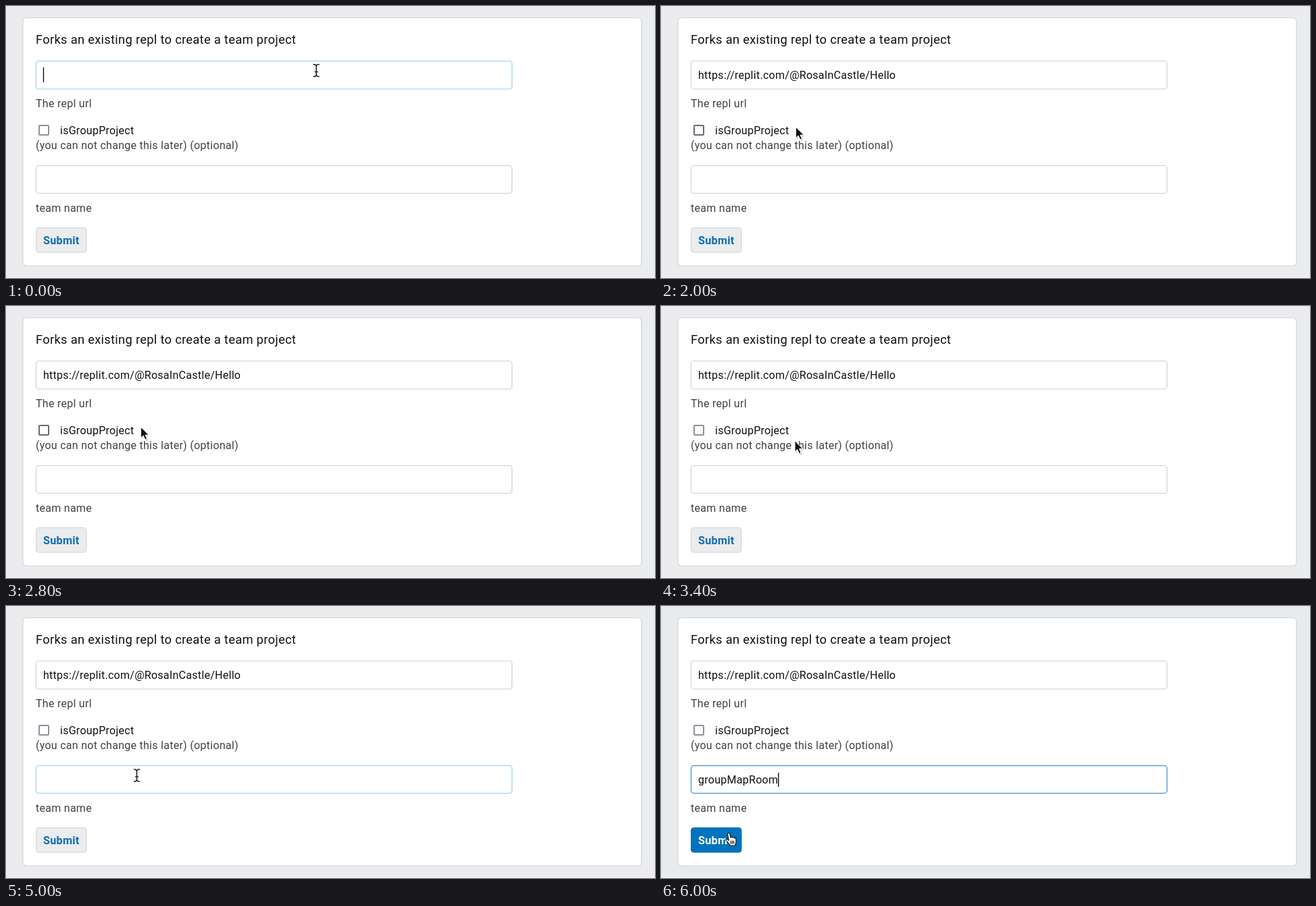
An HTML page that plays this animation: 960x403 px, repeating every 6.2 s.

```html
<!DOCTYPE html>
<html lang="en">
<head>
<meta charset="utf-8">
<title>Fork a team project</title>
<style>
  html, body { margin: 0; width: 100%; height: 100%; overflow: hidden; background: #ebecee; }
  svg { display: block; width: 960px; height: 403px; }
  text { font: 16px Roboto, "Open Sans", sans-serif; letter-spacing: .017em; fill: #111; }
  .title { font-size: 18.3px; }
  .label { fill: #404144; }
  .field { fill: #fff; stroke: #cfd0d2; stroke-width: 1.2; }
  .field.soft { stroke: #98d0ec; }
  .field.strong { stroke: #5b9fd0; stroke-width: 1.5; }
  .caret { stroke: #000; stroke-width: 1.3; }
  #box { fill: #fff; stroke: #918f9c; stroke-width: 2; }
  #box.hover { stroke: #6a6877; }
  #button rect { fill: #ebecee; stroke: #d1d2d5; }
  #button text { font-weight: 700; font-size: 16.2px; fill: #0f6cb3; }
  #button.hover rect { fill: #0073bd; stroke: #0073bd; }
  #button.hover text { fill: #fff; }
  .pointer { stroke-linejoin: round; stroke-linecap: round; }
</style>
</head>
<body>
<svg viewBox="0 0 960 403">
  <rect id="page" width="960" height="402" fill="#ebecee"/>
  <rect y="402" width="960" height="1" fill="#f8f8f9"/>
  <rect x="25" y="17.5" width="915" height="367.5" rx="5" fill="#fff" stroke="#d3d5d8" stroke-width="1.2"/>

  <text class="title" x="44" y="56">Forks an existing repl to create a team project</text>

  <rect id="urlField" x="44.5" y="81.5" width="704" height="41.5" rx="4"/>
  <text id="urlText" x="55" y="108"></text>
  <text class="label" x="44" y="150">The repl url</text>

  <rect id="box" x="49" y="177" width="14" height="14" rx="1"/>
  <text x="80" y="190">isGroupProject</text>
  <text class="label" x="44" y="212">(you can not change this later) (optional)</text>

  <rect id="teamField" x="44.5" y="236.5" width="704" height="41" rx="4"/>
  <text id="teamText" x="55" y="263"></text>
  <text class="label" x="44" y="305">team name</text>

  <g id="button">
    <rect x="44.5" y="328.5" width="74.5" height="36.5" rx="4"/>
    <text x="55" y="353">Submit</text>
  </g>

  <path id="urlCaret" class="caret" d="M0 91V113"/>
  <path id="teamCaret" class="caret" d="M0 247V268"/>

  <!-- pointers: beam is centred, arrow and hand hang from the tip -->
  <g id="beam" class="pointer" fill="none" stroke="#222" stroke-width="1.6">
    <path d="M-4 -9Q0 -9 0 -6Q0 -9 4 -9M0 -6V6M-4 9Q0 9 0 6Q0 9 4 9M-2 2H2"/>
  </g>
  <g id="arrow" class="pointer">
    <path d="M1 2V18L5 15L8 21L11 19.500L9 14H13Z" fill="#000" opacity=".15"/>
    <path d="M0 0V16L3.700 12.600L6.300 18.500L9 17.300L6.500 11.600H11.500Z" fill="#111" stroke="#fff"/>
  </g>
  <g id="hand" class="pointer" fill="#fff" stroke="#111" stroke-width="1.2">
    <path d="M0 1.500C0 -.8 3 -.8 3.300 1.300L4.500 6.500C5 5 7 5.200 7.300 6.800C8 5.600 9.800 6 10 7.500C11 6.800 12.500 7.500 12.500 9V13C12.500 15 11.500 16 11.200 18.500H3.500C3 16 0 14 -2.500 10.500C-3.500 9 -1.500 7.800 -.3 9.200L1.700 10.800Z"/>
    <path d="M4.800 11.500V15.500M7 11.500V15.500M9.200 11.500V15.500"/>
  </g>
</svg>

<script>
const LOOP = 6200, TICK = 200;
const URL_VALUE = "https://replit.com/@RosaInCastle/Hello";
const TEAM_VALUE = "groupMapRoom";

const START = {
  url: "", team: "", urlFocus: "soft", teamFocus: "", caret: "url",
  pointer: "beam", x: 459, y: 95.5, boxHover: false, submitHover: false
};

// Each step changes only the listed parts of the state.
const STEPS = [
  [600, { url: URL_VALUE }],
  [1000, { caret: "" }],
  [2000, { urlFocus: "", pointer: "arrow", x: 199.5, y: 179.5, boxHover: true }],
  [3400, { x: 198, y: 200, boxHover: false }],
  [3600, { x: 195, y: 224 }],
  [3800, { pointer: "beam", x: 193.5, y: 251 }],
  [4000, { teamFocus: "soft", caret: "team" }],
  [4400, { caret: "" }],
  [5200, { team: TEAM_VALUE }],
  [5400, { x: 181, y: 259.5 }],
  [5800, { pointer: "arrow", x: 148, y: 302, teamFocus: "strong", caret: "team" }],
  [6000, { pointer: "hand", x: 98.5, y: 336.5, submitHover: true }]
];

const $ = id => document.getElementById(id);
const show = (el, on) => el.style.display = on ? "" : "none";

function stateAt(time) {
  const past = STEPS.filter(([at]) => at <= time).map(([, change]) => change);
  return Object.assign({}, START, ...past);
}

function drawField(name, value, focus, caret) {
  const text = $(name + "Text"), line = $(name + "Caret");
  text.textContent = value;
  $(name + "Field").setAttribute("class", "field " + focus);
  const end = value ? 55.5 + text.getComputedTextLength() : 55.5;
  line.setAttribute("transform", `translate(${end})`);
  show(line, caret === name);
}

function draw(time) {
  const s = stateAt(time);
  drawField("url", s.url, s.urlFocus, s.caret);
  drawField("team", s.team, s.teamFocus, s.caret);
  $("box").classList.toggle("hover", s.boxHover);
  $("button").classList.toggle("hover", s.submitHover);
  $("page").setAttribute("fill", s.submitHover ? "#e8ebee" : "#ebecee");
  for (const name of ["beam", "arrow", "hand"]) {
    $(name).setAttribute("transform", `translate(${s.x} ${s.y})`);
    show($(name), s.pointer === name);
  }
}

const begin = performance.now();
let shown = -1;
function frame() {
  const time = (performance.now() - begin) % LOOP;
  const tick = Math.floor(time / TICK);
  if (tick !== shown) draw((shown = tick) * TICK);
  requestAnimationFrame(frame);
}
frame();
</script>
</body>
</html>
```
